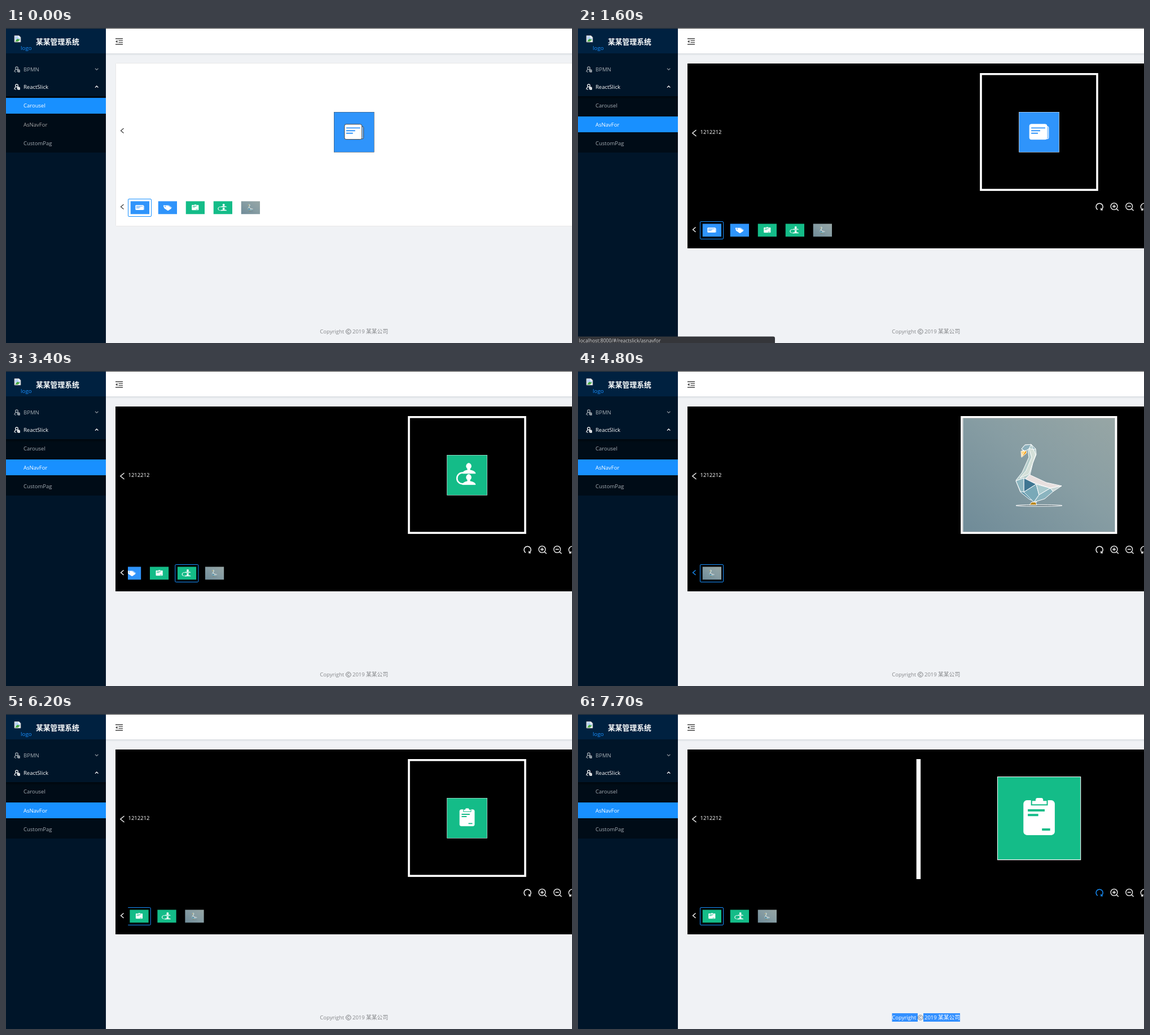
These frames come from a looping animation (1003x559 px, 8 s). An HTML page:

```html
<!DOCTYPE html>
<html lang="zh-CN">
<head>
<meta charset="utf-8">
<style>
html, body { margin: 0; width: 100%; height: 100%; overflow: hidden; background: #f0f2f5; }
svg { display: block; }
text { font: 9.5px "Open Sans", "Noto Sans CJK SC", "Noto Sans CJK", sans-serif; }
.line { fill: none; stroke-width: 1.3; }
.menu { fill: #a6adb4; }
</style>
</head>
<body>
<svg width="1003" height="559" viewBox="0 0 1003 559">
  <defs>
    <symbol id="s0" viewBox="0 0 72 72" preserveAspectRatio="none">
      <path fill="#2f94fb" d="M0 0h72v72H0z"/>
      <rect x="40" y="26" width="13" height="22" rx="2" fill="#91c8ff"/>
      <rect x="19" y="22" width="31" height="27" rx="3" fill="#fff"/>
      <path stroke="#2f94fb" stroke-width="1.8" d="M22 28.5h25M22 33.5h16M22 38h12"/>
    </symbol>
    <symbol id="s1" viewBox="0 0 72 72" preserveAspectRatio="none">
      <path fill="#2f94fb" d="M0 0h72v72H0z"/>
      <path fill="#a9d3ff" d="M30 22l11 1 12 13-14 14z"/>
      <path fill="#fff" d="M20 25q0-2 2-2l15 2 13 14q1 2-1 3L39 52q-2 1-3 0L23 39z"/>
      <circle cx="27" cy="30" r="2.5" fill="#2f94fb"/>
    </symbol>
    <symbol id="s2" viewBox="0 0 72 72" preserveAspectRatio="none">
      <path fill="#14bc88" d="M0 0h72v72H0z"/>
      <rect x="23" y="21" width="26" height="29" rx="2.5" fill="#fff"/>
      <path fill="#fff" stroke="#14bc88" d="M29.5 24.5v-4h3q0-2.5 2-2.5h3.500q2 0 2 2.500h3v4z"/>
      <path stroke="#14bc88" stroke-width="1.9" d="M26.300 29.200h14.500M26.300 33.200h9M38.500 45.700h7"/>
    </symbol>
    <symbol id="s3" viewBox="0 0 72 72" preserveAspectRatio="none">
      <path fill="#14bc88" d="M0 0h72v72H0z"/>
      <g id="man" fill="#fff">
        <ellipse cx="39" cy="20" rx="4.300" ry="5.200"/>
        <path d="M37 23h4v4q10 2 10 6H28q0-4 9-6z"/>
      </g>
      <use href="#man" y="20"/>
      <path fill="none" stroke="#fff" stroke-width="2.600" d="M34 31.700h-6a9.500 9.500 0 0 0 0 20h6"/>
    </symbol>
    <linearGradient id="sky" x1="0" y1="1" x2="1" y2="0">
      <stop stop-color="#6f8b98"/><stop offset=".55" stop-color="#879da3"/><stop offset="1" stop-color="#97a6a5"/>
    </linearGradient>
    <symbol id="s4" viewBox="682 83 270 203" preserveAspectRatio="none">
      <path fill="url(#sky)" d="M682 83h270v203H682z"/>
      <ellipse cx="817" cy="239" rx="41" ry="1.500" fill="#61757d"/>
      <path fill="#b5cdcb" d="M786 138l6-7 11-1 8 8 1 10-6 15-5 21-18 16-7-6 11-14 12-27-2-15-7 4z"/>
      <path fill="#d3dfd8" d="M799 137l5 16-10 24-11 13 16-7 7-20 5-15-4-9z"/>
      <path fill="#8db0bc" d="M786 138l6-7 11-1-4 8-7 4zM803 130l8 8-4 1z"/>
      <path fill="#f6a21d" d="M785 142l9-1 1 4-9 8z"/>
      <path fill="#ffd15a" d="M787 142l5 0-5 9z"/>
      <path fill="#e8e0df" d="M800 184l30 14 27 6-20 4-45-15z"/>
      <path fill="#5e95aa" d="M776 195l14-5 10 23 13 20-13-5-16-13z"/>
      <path fill="#3f7692" d="M790 190l22 11-22 14z"/>
      <path fill="#8db6c0" d="M776 195l14-5v25l-6-1z"/>
      <path fill="#79a9b8" d="M790 215l22-14 5 19-9 13z"/>
      <path fill="#a9cace" d="M812 201l25 7-20 12z"/>
      <path fill="#8bb4bf" d="M837 208l5 6-15 13-19 6 9-13z"/>
      <path fill="#c8d6d5" d="M837 208l20-4-15 10z"/>
      <path fill="#b98517" d="M804 233l7 0 2 5h-13z"/>
    </symbol>
    <linearGradient id="drop" x2="0" y2="1"><stop stop-color="#001529" stop-opacity=".1"/><stop offset="1" stop-color="#001529" stop-opacity="0"/></linearGradient>
    <linearGradient id="inset" x2="0" y2="1"><stop stop-opacity=".45"/><stop offset="1" stop-opacity="0"/></linearGradient>
    <clipPath id="thumbClip"><path d="M216 290h787v100H216z"/></clipPath>
    <clipPath id="mainClip"><path d="M216 80h787v213H216z"/></clipPath>
    <clipPath id="barClip"><rect id="barCut" y="540" width="349" height="20"/></clipPath>
    <g id="tool" fill="none" stroke="currentColor" stroke-width="1.200">
      <circle cx="19" cy="71.200" r="2.300"/>
      <path d="M15 78c0-3 2-4.500 4.500-4.500M16 78h2"/>
      <circle cx="22.300" cy="76" r="1.900" stroke-width="1.500"/><path d="M20 73.500l4.500 5"/>
    </g>
    <path id="prev" class="line" d="M208.500 178l-5 4.300 5 4.300"/>
    <g id="lens" class="line" stroke-width="1.400"><circle cx="950" cy="316.500" r="5.900"/><path d="M954.300 320.800l3.500 3.400M947 316.500h6"/></g>
  </defs>

  <path fill="#f0f2f5" d="M177 0h826v559H177z"/>
  <path fill="url(#drop)" d="M177 45h826v4H177z"/>
  <path fill="#fff" d="M177 0h826v45H177z"/>
  <g stroke="#444" class="line" stroke-width="1.100"><path d="M194 19h13M199.500 22.300h7.500M199.500 25.700h7.500M194 29h13"/><path fill="#444" stroke="none" d="M194 24l3.500-2.600v5.200z"/></g>

  <path fill="#001529" d="M0 0h177v559H0z"/>
  <path fill="#002140" d="M0 0h177v45H0z"/>
  <path fill="#3b3b3b" d="M0 0h1003v1H0z"/>
  <path fill="#fff" stroke="#a5a5a5" stroke-width=".8" d="M15 13.500h8l3 3V25H15z"/>
  <path fill="#b9d3f6" d="M16 14.500h6v3h3v4h-9z"/><path fill="#49a942" d="M16 24l4-5 5 2-4 3z"/>
  <text x="26" y="39" fill="#1890ff" style="font-size:9.800px">logo</text>
  <text x="53" y="29.300" fill="#fff" style="font-size:12.800px;font-weight:700">某某管理系统</text>
  <use href="#tool" color="#a6adb4"/><use href="#tool" y="31" color="#fff"/>
  <text class="menu" x="31" y="76.800">BPMN</text>
  <text x="31" y="107.800" fill="#fff">ReactSlick</text>
  <path class="line" stroke="#848d96" d="M158 71.800l2.700 2.600 2.700-2.600"/>
  <path class="line" stroke="#fff" d="M158 105.600l2.700-2.600 2.700 2.600"/>
  <path fill="#000c17" d="M0 121h177v100H0z"/><path fill="url(#inset)" d="M0 121h177v6H0z"/>
  <rect id="sel" width="177" height="28" fill="#1890ff"/>
  <text id="item0" x="31" y="141.300">Carousel</text>
  <text id="item1" x="31" y="174.800">AsNavFor</text>
  <text class="menu" x="31" y="208.300">CustomPag</text>

  <g id="carousel" stroke="#444">
    <rect x="194.500" y="62.500" width="820" height="289" rx="1" fill="#fff" stroke="#e8e8e8"/>
    <use href="#prev"/><use href="#prev" y="135"/>
    <use href="#s0" x="581" y="149" width="71.500" height="71.500"/>
  </g>

  <g id="spin" fill="#1890ff" opacity=".34">
    <circle cx="616.500" cy="133.800" r="4"/><circle cx="625.700" cy="143" r="4"/><circle cx="616.500" cy="152.200" r="4"/><circle cx="607.300" cy="143" r="4"/>
  </g>

  <g id="nav" stroke="#fff">
    <path stroke="none" d="M194 63h809v328H194z"/>
    <path class="line" d="M209.500 181l-6.700 5.500 6.700 5.500"/>
    <text x="216.500" y="188" fill="#fff" stroke="none">1212212</text>
    <use id="back" href="#prev" y="175.500"/>
    <g clip-path="url(#mainClip)"><g id="main">
      <rect id="frame" y="81.700" height="205.600" fill="none" stroke-width="3.600"/>
      <use id="pic"/>
    </g></g>
    <g id="redo" class="line"><path stroke-width="1.500" d="M920.700 322.300a6.100 6.100 0 1 1 6.800 0"/><path d="M926.800 319.500v3.400h3.200"/></g>
    <g id="zoom"><use href="#lens"/><path class="line" d="M950 313.500v6"/></g>
    <use href="#lens" x="26.700"/>
    <path class="line" stroke-width="1.500" d="M1000 322.300a6.100 6.100 0 1 1 6.800 0M998 323h3v-3"/>
  </g>

  <g id="strip" clip-path="url(#thumbClip)"><g id="thumbs">
    <rect id="mark" y="303.500" width="41" height="31" rx="1.500" fill="none" stroke="#1890ff"/>
  </g></g>

  <path id="pick" fill="#3390ff" d="M556.500 531H602v15h-45.500zM612 531h65v15h-65z"/>
  <g id="foot"><text x="556.300" y="542.300">Copyright</text><text x="614" y="542.300">2019</text><text x="638" y="542.300" style="font-size:9.800px">某某公司</text></g>
  <g stroke="#77797c" fill="none"><circle cx="606.800" cy="538.700" r="4.400"/><path d="M608.600 537.500a2.100 2.100 0 1 0 0 2.400"/></g>

  <g id="bar" clip-path="url(#barClip)">
    <path fill="#35363a" d="M0 547.500h346q3 0 3 3V559H0z"/>
    <text x="1.500" y="558" fill="#d5d7da" style="font-size:8.600px">localhost:8000/#/reactslick/asnavfor</text>
  </g>
</svg>
<script>
const LOOP = 8000, STEP = 49, BLUE = '#1890ff';
const moves = [[2690, 1], [3335, 3], [4150, 4], [5040, 3], [5805, 2]];   // start time, slide
const zooms = [6700, 7100, 7300, 7500];
const $ = id => document.getElementById(id);
const set = (id, attrs) => { for (const k in attrs) $(id).setAttribute(k, attrs[k]); };
const show = (id, on) => set(id, { display: on ? 'inline' : 'none' });
const ramp = (t, a, b) => Math.min(1, Math.max(0, (t - a) / (b - a)));

// cubic-bezier(.25, .1, .25, 1)
function ease(x) {
  let lo = 0, hi = 1, u;
  for (let i = 0; i < 20; i++) {
    u = (lo + hi) / 2;
    if (.75 * u * (1 - u) + u ** 3 < x) lo = u; else hi = u;
  }
  return .3 * u * (1 - u) ** 2 + 3 * u * u * (1 - u) + u ** 3;
}

for (let i = 0; i < 5; i++) {
  const thumb = document.createElementNS('http://www.w3.org/2000/svg', 'use');
  $('thumbs').append(thumb);
  thumb.id = 'thumb' + i;
  set(thumb.id, { href: '#s' + i, x: 220.5 + i * STEP, y: 307.2, width: 33.6, height: 23.2 });
}

function draw(t) {
  const loading = t >= 1300 && t < 1500, nav = t >= 1500;
  let offset = 0, slide = 0, mark = t >= 2300 ? 1 : 0;
  for (const [start, n] of moves) {
    if (t < start) break;
    offset += (n * STEP - offset) * ease(ramp(t, start, start + 500));
    mark = n;
    if (t >= start + 60) slide = n;
  }

  const chosen = t >= 1600, hover = 166 + 89 * ramp(t, 700, 1000);
  set('sel', { y: chosen ? 157 : 124 });
  set('item0', { fill: chosen ? '#a6adb4' : '#fff' });
  set('item1', { fill: chosen ? '#fff' : `rgb(${hover},${hover},${hover})` });

  show('carousel', t < 1300);
  show('spin', loading);
  set('spin', { transform: `rotate(${(t - 1350) * .3} 616.5 143)` });
  show('nav', nav);
  show('strip', !loading);
  set('thumbs', { transform: `translate(${-offset} ${nav ? 40 : 0})` });
  set('strip', { 'clip-path': 'url(#thumbClip)' });
  set('mark', { x: 216.5 + mark * STEP });

  show('main', t >= 1600);
  const scale = 1.2 ** zooms.filter(z => t >= z).length, wide = slide === 4;
  set('main', { transform: `translate(817 184.5) scale(${scale}) translate(-817 -184.5)` });
  set('frame', wide ? { x: 680, width: 273.6 } : { x: 714, width: 206 });
  set('pic', { href: '#s' + slide, ...(wide
    ? { x: 682, y: 83.5, width: 270, height: 202 }
    : { x: 781.3, y: 149, width: 71.5, height: 71.5 }) });
  set('back', { stroke: t >= 4800 && t < 6100 ? BLUE : '#fff' });
  set('zoom', { stroke: t >= 6400 && t < 7700 ? BLUE : '#fff' });
  set('redo', { stroke: t >= 7700 ? BLUE : '#fff' });

  const picked = t >= 7000;
  show('pick', picked);
  set('foot', { fill: picked ? '#fff' : '#85878a' });
  set('bar', { opacity: ramp(t, 780, 950) * (1 - ramp(t, 2250, 2400)) });
  set('barCut', { width: t < 1900 ? 349 : t < 2000 ? 230 : 112 });
}

function tick() {
  draw(performance.now() % LOOP);
  requestAnimationFrame(tick);
}
tick();
</script>
</body>
</html>
```
